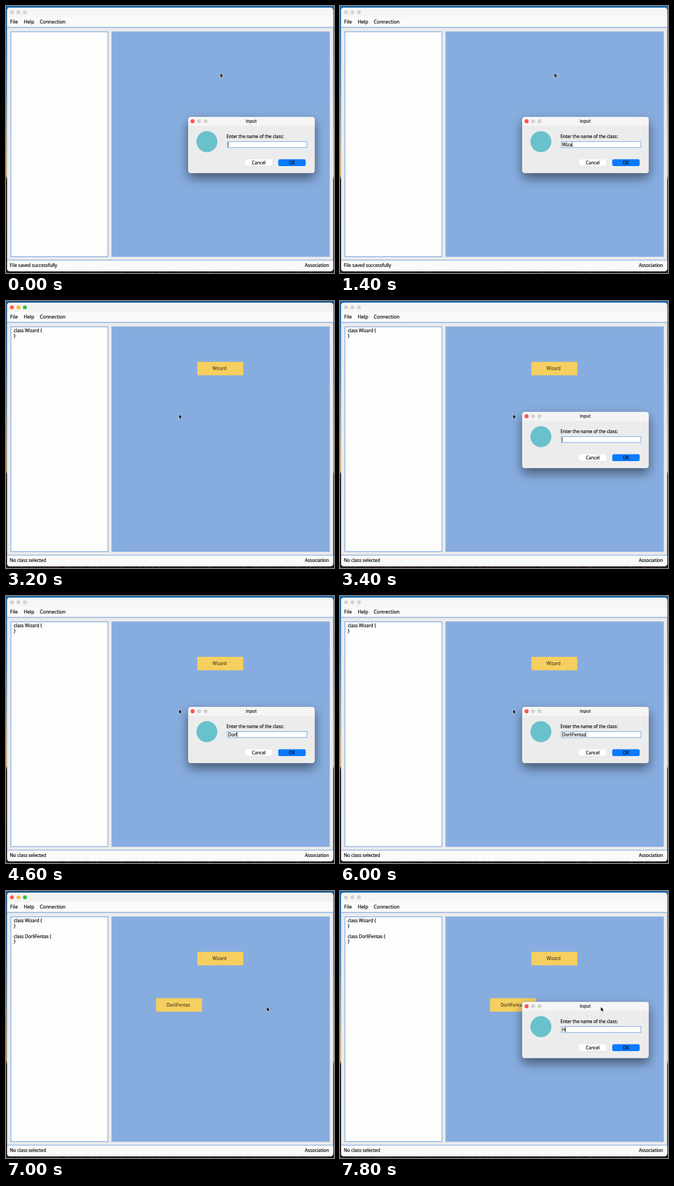
An HTML page that plays this animation: 600 px wide and 487 px high, repeating every 8 s.

```html
<!DOCTYPE html>
<html lang="en">
<head>
<meta charset="utf-8">
<title>Class editor</title>
<style>
  html, body { margin: 0; width: 100%; height: 100%; overflow: hidden; background: #2a211f; }
  svg { display: block; width: 100vw; height: 100vh; }
  text { font: 8.1px "Noto Sans", "Open Sans", sans-serif; fill: #0c0c0c; stroke: #0c0c0c; stroke-width: .22; white-space: pre; }
  .menu text { font-size: 8.8px; }
  .status text { font-size: 8.3px; }
  .box text { fill: #463a1e; stroke: #463a1e; stroke-width: .12; font-size: 8px; text-anchor: middle; }
  .dialog text { font-size: 8.05px; }
  .dialog .title { font: 700 7.8px Inter, "Noto Sans", sans-serif; fill: #3a3a3a; stroke: none; text-anchor: middle; }
  .dialog .button { text-anchor: middle; font-size: 8px; }
</style>
</head>
<body>
<svg viewBox="0 0 600 487" preserveAspectRatio="none">
  <defs>
    <linearGradient id="sky" x2="0" y2="1">
      <stop offset="0" stop-color="#1d69aa"/>
      <stop offset=".25" stop-color="#4f83ad"/>
      <stop offset=".48" stop-color="#a9a79f"/>
      <stop offset=".635" stop-color="#d8b878"/>
      <stop offset=".65" stop-color="#2b2220"/>
      <stop offset="1" stop-color="#241c1b"/>
    </linearGradient>
    <filter id="shadow" x="-30%" y="-50%" width="160%" height="220%">
      <feDropShadow dx="0" dy="9" stdDeviation="10" flood-color="#000" flood-opacity=".5"/>
    </filter>
    <clipPath id="frame"><rect x="2" y="3" width="596.5" height="481" rx="5"/></clipPath>
  </defs>

  <rect width="600" height="487" fill="url(#sky)"/>
  <rect id="shade" width="600" height="487" fill="#302a2c" opacity=".2"/>
  <g id="ground"></g>

  <g clip-path="url(#frame)">
    <rect y="3" width="600" height="482" fill="#ebebeb"/>
    <rect id="bar" y="3" width="600" height="17"/>
    <rect y="20" width="600" height="18.5" fill="#fafafa"/>
    <rect y="38.3" width="600" height="1.5" fill="#84aee6"/>
    <rect y="462.9" width="600" height="1.5" fill="#84aee6"/>
    <rect y="464.4" width="600" height="20" fill="#fafafa"/>
  </g>
  <g id="lights">
    <circle cx="10.8" cy="11.5" r="3.6"/>
    <circle cx="22.8" cy="11.5" r="3.6"/>
    <circle cx="34.6" cy="11.5" r="3.6"/>
  </g>
  <g class="menu">
    <text x="7.6" y="32.2">File</text>
    <text x="32.4" y="32.2">Help</text>
    <text x="61.8" y="32.2">Connection</text>
  </g>
  <rect x="9" y="47" width="177.4" height="410" fill="#fdfdfd" stroke="#84aee6" stroke-width="1.4"/>
  <rect x="193" y="46.5" width="399.3" height="411" fill="#87ade0"/>
  <g id="code"></g>
  <g class="status">
    <text id="note" x="7" y="476.4"></text>
    <text x="591" y="476.4" text-anchor="end">Association</text>
  </g>
  <g id="boxes" class="box"></g>

  <g id="dialog" class="dialog">
    <rect x="333" y="202" width="232" height="103" rx="5.5" fill="#ececec" filter="url(#shadow)"/>
    <path d="M333 218.5V207.5a5.5 5.5 0 0 1 5.5-5.5H559.5a5.5 5.5 0 0 1 5.5 5.5V218.5Z" fill="#f5f5f5"/>
    <rect x="333" y="202" width="232" height="103" rx="5.5" fill="none" stroke="#000" stroke-opacity=".2" stroke-width=".6"/>
    <circle cx="341.3" cy="210.2" r="3.7" fill="#fc5650"/>
    <circle cx="353.2" cy="210.2" r="3.6" fill="#d3d3d3"/>
    <circle cx="365" cy="210.2" r="3.6" fill="#d3d3d3"/>
    <text class="title" x="448.7" y="212.8">Input</text>
    <circle cx="367.5" cy="247.5" r="19.2" fill="#69c1cb"/>
    <text x="403.3" y="241">Enter the name of the class:</text>
    <rect x="405" y="247.3" width="145.4" height="10.8" fill="#fff" stroke="#84b0ea" stroke-width="1.2"/>
    <text id="entry" x="406.3" y="255.5"></text>
    <rect id="caret" y="248.3" width=".8" height="8.8" fill="#111"/>
    <rect x="437" y="279.7" width="50.6" height="12.6" rx="3" fill="#000" opacity=".13"/>
    <rect x="437.2" y="279.4" width="50.2" height="12.3" rx="3" fill="#fff"/>
    <rect x="498" y="279.4" width="50.2" height="12.6" rx="3" fill="#0a7aff"/>
    <text class="button" x="462.3" y="288.5">Cancel</text>
    <text class="button" x="523.2" y="288.5">OK</text>
  </g>

  <path id="pointer" d="M0 0V8.3L1.9 6.6 3.2 9.5 4.7 8.8 3.4 6H6Z" fill="#000" stroke="#fff" stroke-width=".6"/>
</svg>
<script>
const LOOP = 8000, STEP = 200;
const $ = id => document.getElementById(id);

const classes = [
  { name: "Wizard", x: 392, y: 123.3, added: 2200 },
  { name: "DorliFentas", x: 316.5, y: 207.8, added: 6400 }
];

// Each dialog: opening and closing time, word, time of every keystroke
const dialogs = [
  { from: 0, to: 2200, word: "Wizard", keys: [1000, 1200, 1200, 1400, 1600, 1800] },
  { from: 3400, to: 6400, word: "DorliFentas",
    keys: [4000, 4200, 4400, 4600, 5000, 5200, 5400, 5600, 5800, 5800, 6000] },
  { from: 7400, to: LOOP, word: "H", keys: [7800] }
];

// Pointer moves: start, end, from, to
const moves = [
  { t0: 2200, t1: 3000, a: [392, 122.2], b: [316.5, 206.6] },
  { t0: 6400, t1: 7000, a: [316.5, 206.6], b: [477, 211.3] }
];

function add(parent, tag, attrs, label) {
  const el = document.createElementNS("http://www.w3.org/2000/svg", tag);
  for (const key in attrs) el.setAttribute(key, attrs[key]);
  if (label) el.textContent = label;
  parent.append(el);
  return el;
}

const show = (el, on) => { el.style.display = on ? "" : "none"; };

function build() {
  let seed = 7;
  const random = () => (seed = seed * 16807 % 2147483647) / 2147483647;
  for (let x = 0; x < 600; x += 6) {
    add($("ground"), "rect", {
      x: x + random() * 4, y: 484.5 + random(), width: 1 + random() * 3, height: 1,
      fill: random() < .5 ? "#483a34" : "#171314"
    });
  }
  classes.forEach((c, i) => {
    c.box = add($("boxes"), "g", {});
    add(c.box, "rect", { x: c.x - 42, y: c.y - 12.3, width: 84, height: 24.5, fill: "#f5cf5f" });
    add(c.box, "text", { x: c.x - 1.4, y: c.y + 3 }, c.name);
    c.code = add($("code"), "g", {});
    const y = 57.4 + i * 28.5;
    add(c.code, "text", { x: 14.2, y }, `class ${c.name} {`);
    add(c.code, "text", { x: 14.2, y: y + 9.5 }, "}");
  });
}

function pointerAt(t) {
  let spot = moves[0].a;
  for (const { t0, t1, a, b } of moves) {
    if (t < t0) break;
    const u = Math.min(1, (t - t0) / (t1 - t0));
    const e = u * u * (3 - 2 * u);
    spot = a.map((v, i) => v + (b[i] - v) * e);
  }
  return spot;
}

function draw(time) {
  const t = Math.floor(time % LOOP / STEP) * STEP;
  const open = dialogs.find(d => t >= d.from && t < d.to);

  classes.forEach(c => {
    show(c.box, t >= c.added);
    show(c.code, t >= c.added);
  });
  $("note").textContent = t < classes[0].added ? "File saved successfully" : "No class selected";

  // The main window is active only while no dialog is open
  show($("shade"), !open);
  $("bar").setAttribute("fill", open ? "#f6f6f6" : "#f3f2f3");
  const colors = open ? ["#d3d3d3", "#d3d3d3", "#d3d3d3"] : ["#fd5b52", "#fcbb2f", "#2bc440"];
  [...$("lights").children].forEach((dot, i) => dot.setAttribute("fill", colors[i]));

  show($("dialog"), open);
  if (open) {
    const typed = open.word.slice(0, open.keys.filter(k => k <= t).length);
    $("entry").textContent = typed;
    const width = typed ? $("entry").getComputedTextLength() : 0;
    $("caret").setAttribute("x", 406.2 + width);
  }
  $("pointer").setAttribute("transform", `translate(${pointerAt(t)})`);
}

build();
let start;
function tick(now) {
  start ??= now;
  draw(now - start);
  requestAnimationFrame(tick);
}
draw(0);
requestAnimationFrame(tick);
</script>
</body>
</html>
```
